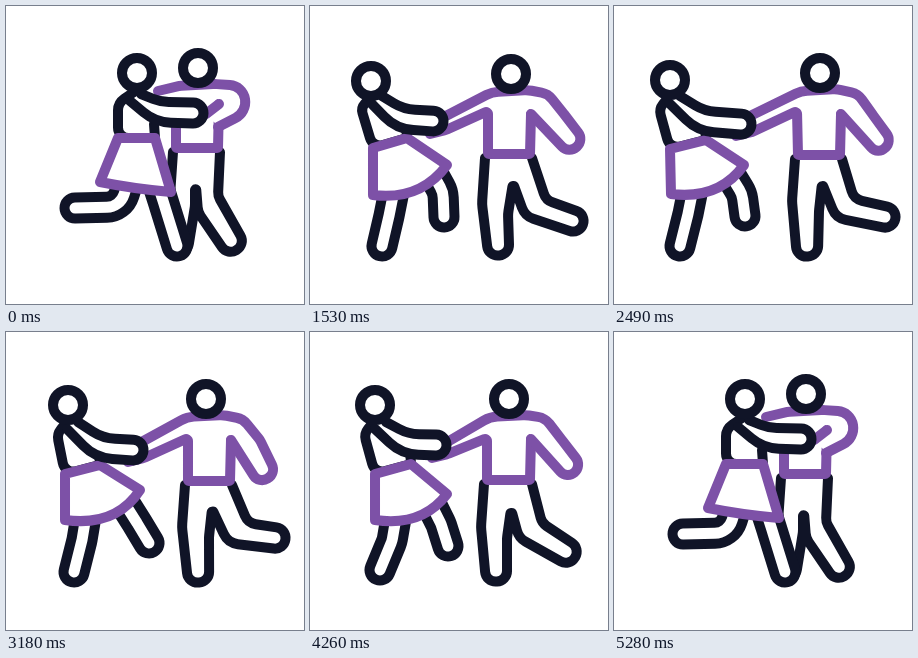
An HTML page with a canvas that plays this animation: 298x298 px, repeating every 5400 ms.

```html
<!DOCTYPE html>
<html lang="en">
<head>
<meta charset="utf-8">
<title>Dancing couple</title>
<style>
  html, body { margin: 0; width: 100%; height: 100%; overflow: hidden; background: #fff; }
  canvas { display: block; width: 298px; height: 298px; }
</style>
</head>
<body>
<canvas id="stage"></canvas>
<script>
const SIZE = 298, LOOP = 5400, MOVE = 5280;
const DARK = '#101427', PURPLE = '#7d51a7', WHITE = '#fff';
const LINE = 10, HALF = 10.5;

const canvas = document.getElementById('stage');
const scale = window.devicePixelRatio || 1;
canvas.width = canvas.height = Math.round(SIZE * scale);
const ctx = canvas.getContext('2d');

// Each part is a flat list of x, y pairs.
// reach: hand, armpit, lower arm.  arm: shoulder curve, elbow, hand, armpit.
// legs: knee, foot, inner knee, crotch, inner knee, foot, knee.
// skirt: waist left, waist right, hem right, hem curve, hem left.
const close = {
  head: [192, 62], reach: [152, 85, 170, 116, 150, 106], waist: [170, 142, 212, 142],
  arm: [237, 80, 241, 106, 212, 121, 200, 108, 213, 98],
  legs: [164, 190, 172, 236, 189, 200, 189, 168, 192, 206, 225, 235, 212, 190],
  face: [131, 67], back: [112, 97], hold: [129, 92, 152, 106, 187, 107],
  skirt: [112, 132, 149, 132, 165, 186, 129, 183, 94, 176],
  legA: [122, 176, 114, 201, 69, 202], legB: [151, 176, 158, 198, 171, 240]
};
const parting = {
  head: [195, 65], reach: [148, 100, 177, 106, 137, 122], waist: [177, 147, 217, 147],
  arm: [237, 82, 241, 104, 238, 141, 217, 141, 217, 102],
  legs: [169, 195, 183, 239, 196, 206, 196, 177, 203, 208, 239, 230, 220, 192],
  face: [83, 72], back: [67, 99], hold: [82, 94, 106, 106, 140, 107],
  skirt: [72, 140, 108, 132, 143, 167, 115, 195, 71, 187],
  legA: [97, 180, 89, 207, 65, 229], legB: [125, 176, 136, 198, 149, 225]
};
const drifting = {
  head: [199, 67], reach: [134, 112, 177, 106, 138, 122], waist: [177, 148, 220, 148],
  arm: [235, 86, 252, 108, 272, 134, 257, 147, 221, 107],
  legs: [171, 195, 186, 239, 197, 206, 201, 177, 209, 206, 256, 220, 232, 191],
  face: [65, 73], back: [54, 102], hold: [70, 94, 95, 112, 126, 113],
  skirt: [65, 142, 101, 132, 137, 162, 112, 195, 65, 188],
  legA: [87, 180, 82, 209, 70, 238], legB: [122, 174, 131, 192, 138, 214]
};
const open = {
  head: [201, 68], reach: [132, 112, 178, 105, 136, 124], waist: [178, 148, 220, 148],
  arm: [238, 88, 254, 108, 274, 134, 259, 148, 221, 108],
  legs: [172, 198, 188, 239, 198, 208, 203, 177, 215, 210, 263, 215, 236, 194],
  face: [61, 75], back: [51, 102], hold: [66, 94, 90, 113, 123, 115],
  skirt: [63, 142, 97, 132, 137, 159, 110, 195, 63, 189],
  legA: [85, 180, 79, 210, 72, 240], legB: [123, 168, 133, 186, 134, 211]
};
const widest = {
  head: [206, 67], reach: [132, 112, 183, 105, 138, 126], waist: [184, 149, 226, 149],
  arm: [244, 88, 259, 109, 278, 135, 264, 149, 227, 108],
  legs: [178, 195, 193, 240, 205, 205, 208, 177, 222, 212, 271, 211, 240, 193],
  face: [56, 74], back: [45, 103], hold: [60, 94, 87, 115, 127, 118],
  skirt: [56, 143, 92, 134, 130, 159, 105, 194, 57, 188],
  legA: [80, 178, 74, 208, 66, 240], legB: [117, 170, 128, 188, 131, 210]
};
const closing = {
  head: [200, 67], reach: [132, 112, 182, 106, 138, 126], waist: [182, 149, 224, 149],
  arm: [237, 87, 254, 108, 270, 141, 253, 152, 225, 108],
  legs: [176, 195, 192, 240, 203, 205, 206, 177, 222, 211, 269, 206, 242, 191],
  face: [62, 73], back: [51, 102], hold: [66, 94, 93, 116, 127, 118],
  skirt: [59, 142, 94, 133, 134, 158, 110, 195, 59, 188],
  legA: [81, 178, 76, 208, 68, 240], legB: [119, 172, 131, 191, 143, 211]
};
const keys = [
  [0, close], [660, parting], [1020, drifting], [1530, open], [2490, widest],
  [3180, closing], [4260, drifting], [4620, parting], [MOVE, close]
];

// Smooth spline through the poses, at rest at both ends.
function poseAt(t) {
  let i = 0;
  while (i < keys.length - 2 && t >= keys[i + 1][0]) i++;
  const [t0, p0] = keys[i], [t1, p1] = keys[i + 1];
  const span = t1 - t0, u = Math.min(1, (t - t0) / span);
  const u2 = u * u, u3 = u2 * u;
  const slope = (k, part, j) => {
    const a = keys[k - 1], b = keys[k + 1];
    return a && b ? (b[1][part][j] - a[1][part][j]) / (b[0] - a[0]) * span : 0;
  };
  const pose = {};
  for (const part in p0) {
    const flat = p0[part].map((v, j) =>
      (2 * u3 - 3 * u2 + 1) * v + (3 * u2 - 2 * u3) * p1[part][j] +
      (u3 - 2 * u2 + u) * slope(i, part, j) + (u3 - u2) * slope(i + 1, part, j));
    pose[part] = [];
    for (let j = 0; j < flat.length; j += 2) pose[part].push([flat[j], flat[j + 1]]);
  }
  return pose;
}

const shift = (p, x, y) => [p[0] + x, p[1] + y];
const mid = (a, b) => [(a[0] + b[0]) / 2, (a[1] + b[1]) / 2];
const bend = (p, r) => [p[0], p[1], r];

function unit(a, b) {
  const x = b[0] - a[0], y = b[1] - a[1], len = Math.hypot(x, y) || 1;
  return [x / len, y / len];
}

// Two corners that round into the end of a limb.
function tip(from, end) {
  const [x, y] = unit(from, end);
  return [1, -1].map(s => shift(end, HALF * (x - s * y), HALF * (y + s * x)));
}

// Polyline with rounded corners; a point may carry its own radius.
function trace(pts) {
  ctx.beginPath();
  ctx.moveTo(pts[0][0], pts[0][1]);
  for (let i = 1; i < pts.length - 1; i++) {
    const a = pts[i - 1], b = pts[i], c = pts[i + 1];
    const [ax, ay] = unit(b, a), [cx, cy] = unit(b, c);
    const cos = Math.max(-0.9999, Math.min(0.9999, ax * cx + ay * cy));
    const room = Math.min(Math.hypot(a[0] - b[0], a[1] - b[1]), Math.hypot(c[0] - b[0], c[1] - b[1])) / 2;
    const r = Math.min(b[2] ?? HALF, room * Math.sqrt((1 - cos) / (1 + cos)));
    ctx.arcTo(b[0], b[1], c[0], c[1], r);
  }
  const end = pts[pts.length - 1];
  ctx.lineTo(end[0], end[1]);
}

function stroke(color, width = LINE) {
  ctx.strokeStyle = color;
  ctx.lineWidth = width;
  ctx.stroke();
}

function line(pts, color) {
  trace(pts);
  stroke(color);
}

function blank(pts) {
  trace(pts);
  ctx.fillStyle = WHITE;
  ctx.fill();
}

function shape(pts, color) {
  blank(pts);
  stroke(color);
}

function tube([hip, knee, foot]) {
  trace([hip, bend(knee, 24), foot]);
  stroke(DARK, 2 * HALF + LINE);
  stroke(WHITE, 2 * HALF - LINE);
}

function ring([x, y]) {
  ctx.beginPath();
  ctx.arc(x, y, 15, 0, Math.PI * 2);
  ctx.fillStyle = WHITE;
  ctx.fill();
  stroke(DARK);
}

function drawMan(p, handHidden) {
  const head = p.head[0];
  const [left, right] = p.waist;
  const [kneeL, footL, innerL, crotch, innerR, footR, kneeR] = p.legs;
  shape([
    shift(left, -3, 4), bend(kneeL, 40), ...tip(mid(kneeL, innerL), footL), bend(innerL, 30),
    bend(crotch, 1), bend(innerR, 18), ...tip(mid(kneeR, innerR), footR), bend(kneeR, 14),
    shift(right, 2, 4)
  ], DARK);

  const [hand, pit, under] = p.reach;
  const [curve, elbow, outer, inner, armpit] = p.arm;
  const shoulderL = bend(shift(head, -19, 18), 30), shoulderR = bend(shift(head, 17, 16), 30);
  const side = [shift(under, -16, 4), bend(under, 20), bend(pit, 2), bend(left, 1), bend(right, 1), armpit];
  blank([...side, shoulderR, shoulderL, hand]);
  line(side, PURPLE);

  const sleeve = [shoulderR, bend(curve, 18), bend(elbow, 18), outer];
  blank([...sleeve, inner, armpit]);
  if (handHidden) {
    line([hand, shoulderL, ...sleeve], PURPLE);
    line([inner, armpit], PURPLE);
  } else {
    line([hand, shoulderL, ...sleeve, inner, armpit], PURPLE);
  }
  ring(head);
}

function drawWoman(p) {
  const face = p.face[0];
  const [waistL, waistR, hemR, hem, hemL] = p.skirt;
  tube(p.legB);
  tube(p.legA);
  shape([shift(face, -3, 19), bend(p.back[0], 14), waistL, bend(waistR, 1), shift(waistR, -1, -14)], DARK);

  ctx.beginPath();
  ctx.moveTo(...waistL);
  ctx.lineTo(...waistR);
  ctx.lineTo(...hemR);
  ctx.quadraticCurveTo(...hem, ...hemL);
  ctx.closePath();
  ctx.fillStyle = WHITE;
  ctx.fill();
  stroke(PURPLE);

  const [shoulder, elbow, hand] = p.hold;
  const [x, y] = unit(shoulder, hand);
  shape([
    shift(shoulder, -5, 3), bend(shift(elbow, -y * HALF, x * HALF), 45), ...tip(elbow, hand),
    bend(shift(elbow, y * HALF, -x * HALF), 45), shift(shoulder, 6, -4)
  ], DARK);
  ring(face);
}

function draw(now) {
  const t = Math.min(now % LOOP, MOVE);
  const pose = poseAt(t);
  ctx.setTransform(scale, 0, 0, scale, 0, 0);
  ctx.fillStyle = WHITE;
  ctx.fillRect(0, 0, SIZE, SIZE);
  ctx.lineCap = ctx.lineJoin = 'round';
  drawMan(pose, Math.min(t, MOVE - t) < 150);
  drawWoman(pose);
}

const start = performance.now();
function tick() {
  draw(performance.now() - start);
  requestAnimationFrame(tick);
}
tick();
</script>
</body>
</html>
```
